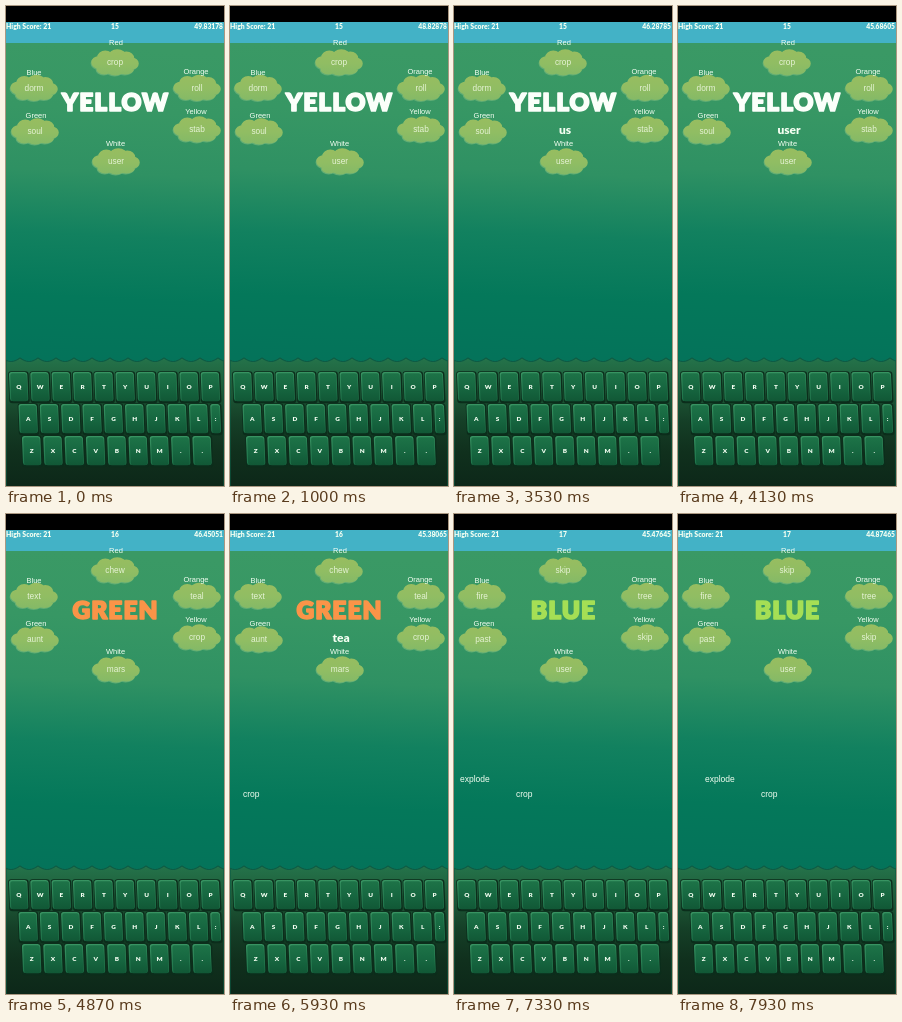
These frames come from a looping animation (218x480 px, 8 s). An HTML page with a canvas:

```html
<!DOCTYPE html>
<html lang="en">
<head>
<meta charset="utf-8">
<title>Word colour typing game</title>
<style>
html, body { margin: 0; width: 100%; height: 100%; overflow: hidden; background: #000; }
canvas { display: block; width: 218px; height: 480px; }
</style>
</head>
<body>
<canvas id="stage"></canvas>
<script>
const W = 218, H = 480, LOOP = 8000, STEP = 200 / 3;
const canvas = document.getElementById('stage');
const ratio = window.devicePixelRatio || 1;
canvas.width = W * ratio;
canvas.height = H * ratio;
const ctx = canvas.getContext('2d');
ctx.scale(ratio, ratio);

const PLAIN = '"Liberation Sans", Arial, sans-serif';
const HEAVY = 'Lato, sans-serif';

// label, label x, label y, cloud x, cloud y
const clouds = [
  ['Red', 110, 36.5, 109, 57],
  ['Blue', 28, 66.5, 28, 82.5],
  ['Orange', 190, 65.5, 191, 82.5],
  ['Green', 30, 109.5, 29, 126],
  ['Yellow', 190, 105.5, 191, 124],
  ['White', 109.5, 137.5, 110, 156]
];

const rounds = [
  { start: 0, title: 'YELLOW', color: '#fbfffa', answer: 'user', typeAt: 3130, pace: 260,
    words: ['crop', 'dorm', 'roll', 'soul', 'stab', 'user'] },
  { start: 4260, title: 'GREEN', color: '#fa9448', answer: 'teal', typeAt: 5330, pace: 240,
    words: ['chew', 'text', 'teal', 'aunt', 'crop', 'mars'] },
  { start: 6320, title: 'BLUE', color: '#a5df55', answer: '', typeAt: LOOP, pace: 1,
    words: ['skip', 'fire', 'tree', 'past', 'skip', 'user'] }
];

const drifters = [
  { word: 'crop', x: 83, y: 280 },
  { word: 'explode', x: 27, y: 265 }
];

const keyRows = [
  { keys: 'QWERTYUIOP', x: 12.5, y: 366 },
  { keys: 'ASDFGHJKL:', x: 22, y: 398 },
  { keys: 'ZXCVBNM..', x: 25.5, y: 430 }
];

function text(str, x, y, size, { font = PLAIN, weight = 400, color = '#f4fff2', align = 'center' } = {}) {
  ctx.font = `${weight} ${size}px ${font}`;
  ctx.textAlign = align;
  ctx.textBaseline = 'alphabetic';
  ctx.fillStyle = color;
  ctx.fillText(str, x, y);
}

// Evenly spaced colours from y0 to y1; tilt leans the bands sideways.
function gradient(y0, y1, colors, tilt = 0) {
  const g = ctx.createLinearGradient(tilt, y0, 0, y1);
  colors.forEach((c, i) => g.addColorStop(i / (colors.length - 1), c));
  return g;
}

function box(x, y, w, h, r, fill) {
  ctx.beginPath();
  ctx.roundRect(x, y, w, h, r);
  ctx.fillStyle = fill;
  ctx.fill();
}

function drawBackground() {
  ctx.fillStyle = '#000';
  ctx.fillRect(0, 0, W, H);
  ctx.fillStyle = '#43b2c6';
  ctx.fillRect(0, 16, W, 21);
  ctx.fillStyle = gradient(37, 350,
    ['#3a9965', '#379764', '#2f9163', '#12815f', '#04785a', '#04735a'], 16);
  ctx.fillRect(0, 37, W, 321);
}

function cloudShape(x, y, fill) {
  const puffs = [[-16, 0, 8, 6.5], [-10, -5, 8, 7], [2, -6, 9, 7.2], [11, -4, 8, 7],
                 [16.5, 1, 7, 6], [-11, 6, 8, 6], [0, 7, 9, 6.2], [10, 6, 9, 6]];
  ctx.fillStyle = fill;
  ctx.beginPath();
  for (const [dx, dy, rx, ry] of puffs) {
    ctx.moveTo(x + dx + rx, y + dy);
    ctx.ellipse(x + dx, y + dy, rx, ry, 0, 0, 2 * Math.PI);
  }
  ctx.fill();
  ctx.fillRect(x - 14, y - 4, 28, 10);
}

function drawCloud(x, y) {
  cloudShape(x - 0.4, y + 0.4, '#62ad74');
  cloudShape(x + 0.3, y - 0.6, gradient(y - 12, y + 13, ['#97bd60', '#90bd63', '#83b967']));
}

function drawKey(label, x, y, w) {
  ctx.save();
  ctx.translate(x, y);
  ctx.transform(1, 0, 0.04, 1, -0.6, 0);
  box(-9.8, -0.8, w + 2, 32, 3, '#0b2d1b');
  box(-9, 0, w - 0.2, 29, 2.5, gradient(0, 29, ['#389462', '#1d7149']));
  box(-7.8, 1.2, w - 2, 28, 2.2, gradient(0, 29, ['#1e7448', '#176841', '#115836']));
  ctx.restore();
  text(label, x + w / 2 - 9, y + 17.3, 6.4, { font: HEAVY, weight: 900 });
}

function drawKeyboard() {
  ctx.beginPath();
  ctx.moveTo(0, H);
  for (let x = 0; x <= W; x++) ctx.lineTo(x, 352 + 3.5 * Math.abs(Math.sin((x + 4) * Math.PI / 18)));
  ctx.lineTo(W, H);
  ctx.fillStyle = gradient(352, 478, ['#24734a', '#1e5a38', '#153f27', '#10301d', '#0d2819']);
  ctx.fill();
  ctx.strokeStyle = '#0d5c45';
  ctx.lineWidth = 1.2;
  ctx.stroke();
  for (const { keys, x, y } of keyRows)
    [...keys].forEach((key, i) => drawKey(key, x + i * 21.3, y, key === ':' ? 10 : 18.5));
}

function drawTitle({ title, color }) {
  ctx.letterSpacing = '1px';
  text(title, 109.5, 105, 24.5, { font: HEAVY, weight: 900, color });
  ctx.strokeStyle = color;
  ctx.lineWidth = 1.6;
  ctx.lineJoin = 'round';
  ctx.strokeText(title, 109.5, 105);
  ctx.letterSpacing = '0px';
}

function render(t) {
  const index = rounds.findLastIndex(r => t >= r.start);
  const round = rounds[index];
  const heavy = { font: HEAVY, weight: 900 };
  drawBackground();

  text('High Score: 21', 0, 22.5, 6.9, { ...heavy, align: 'left' });
  text(15 + index, 109, 22.5, 6.7, heavy);
  // Each correct answer adds 1.5 seconds.
  const remaining = 49.83178 - t * 0.001003 + 1.5 * index;
  text(remaining.toFixed(5), 217, 22.5, 6.7, { ...heavy, align: 'right' });

  clouds.forEach(([label, lx, ly, cx, cy], i) => {
    drawCloud(cx, cy);
    text(label, lx, ly + 2.5, 7.5);
    text(round.words[i], cx, cy + 2.3, 8.3, { color: '#e6f3d6' });
  });

  drawTitle(round);
  const typed = Math.max(0, Math.floor((t - round.typeAt) / round.pace) + 1);
  text(round.answer.slice(0, typed), 111, 127.5, 12, heavy);

  for (const { word, x, y } of drifters)
    text(word, x + (t - 7933) * 0.035, y + 3, 8.5, { align: 'left' });

  drawKeyboard();
}

const begin = performance.now();
function frame() {
  const t = (performance.now() - begin) % LOOP;
  render(Math.floor((t + 4) / STEP) * STEP % LOOP);
  requestAnimationFrame(frame);
}
frame();
</script>
</body>
</html>
```
